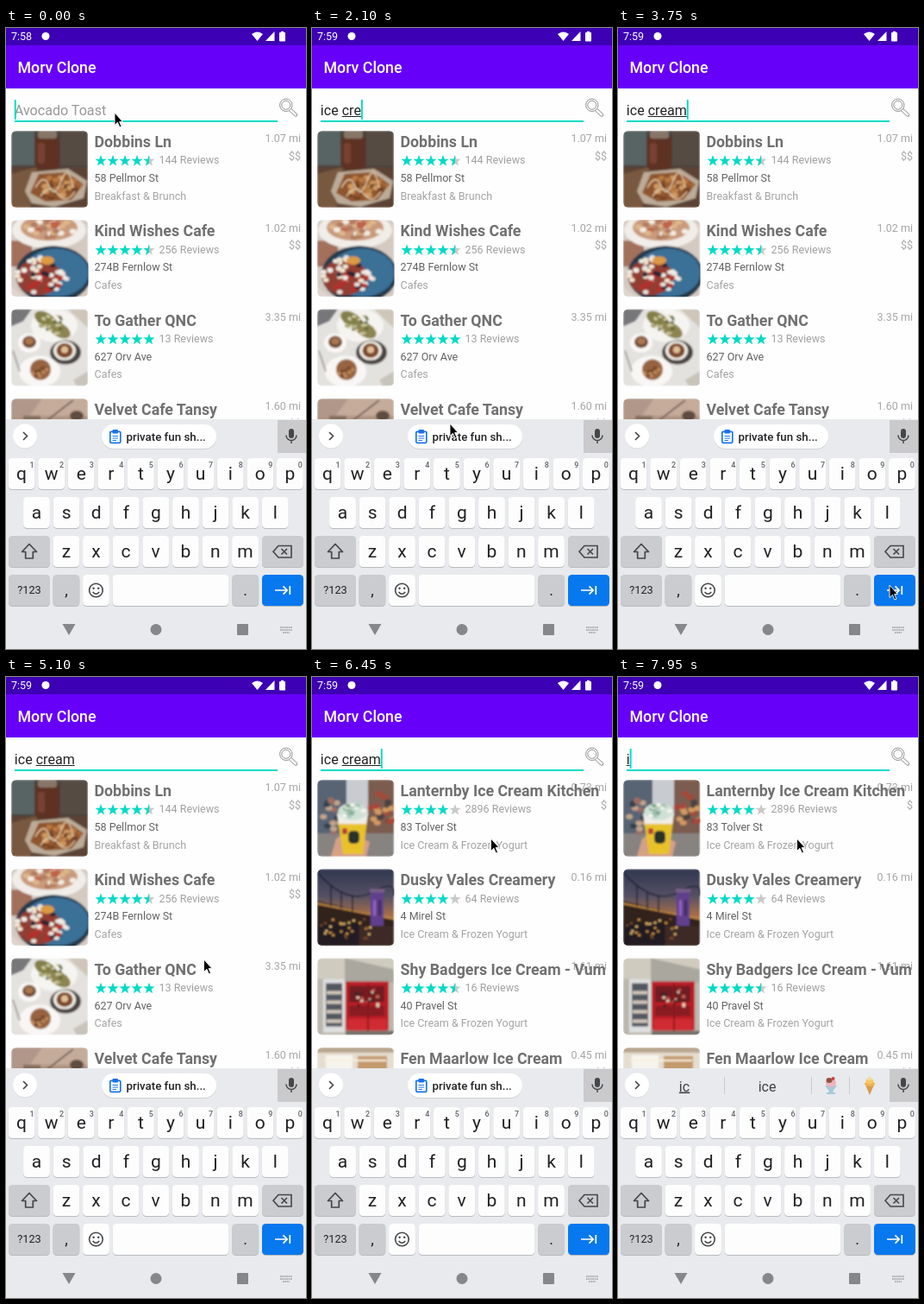
These frames come from a looping animation (348x719 px, 8 s). An HTML page:

```html
<!DOCTYPE html>
<html lang="en">
<head>
<meta charset="utf-8">
<title>Restaurant search</title>
<style>
html, body { margin: 0; width: 100%; height: 100%; overflow: hidden; background: #fff; }
svg { display: block; width: 348px; height: 719px; font-family: Roboto, sans-serif; }
text { white-space: pre; }
</style>
</head>
<body>
<svg id="stage" viewBox="0 0 348 719" xmlns="http://www.w3.org/2000/svg"></svg>
<script>
const LOOP = 8000, TEAL = '#03dac5', PITCH = 103.3;

const rect = (x, y, w, h, fill, r = 0, extra = '') =>
  `<rect x="${x}" y="${y}" width="${w}" height="${h}" rx="${r}" fill="${fill}" ${extra}/>`;
const oval = (x, y, rx, ry, fill, extra = '') =>
  `<ellipse cx="${x}" cy="${y}" rx="${rx}" ry="${ry}" fill="${fill}" ${extra}/>`;
const path = (d, fill, extra = '') => `<path d="${d}" fill="${fill}" ${extra}/>`;
const line = (d, stroke, width = 1, extra = '') =>
  `<path d="${d}" fill="none" stroke="${stroke}" stroke-width="${width}" ${extra}/>`;
const text = (x, y, size, fill, s, extra = '') =>
  `<text x="${x}" y="${y}" font-size="${size}" fill="${fill}" ${extra}>${s}</text>`;
const MID = 'text-anchor="middle"', END = 'text-anchor="end"', MEDIUM = 'font-weight="500"';

// Seeded scatter of small blobs inside an ellipse
function scatter(n, seed, cx, cy, rx, ry, size, colors) {
  let s = seed, out = '';
  const rnd = () => (s = (s * 16807) % 2147483647) / 2147483647;
  for (let i = 0; i < n; i++) {
    const a = rnd() * 6.283, d = Math.sqrt(rnd());
    out += oval(cx + rx * d * Math.cos(a), cy + ry * d * Math.sin(a), size, size * .75, colors[i % colors.length]);
  }
  return out;
}

const photos = {
  toast: () => rect(0, 0, 89, 89, '#47423d') + rect(0, 0, 27, 40, '#596463') + rect(57, 0, 32, 40, '#564b42') +
    rect(0, 42, 89, 47, '#5b4335') + path('M0 50L30 42 22 89H0Z', '#79593f') +
    rect(28, 5, 28, 40, '#5d3124', 5) + rect(31, 0, 22, 9, '#877568', 3) + rect(31, 14, 8, 24, '#774231', 3) +
    path('M16 70L24 48 66 44 88 58 84 78 50 88 24 84Z', '#bcab98') + path('M22 72L32 50 64 48 84 62 70 80 40 82Z', '#8e552d') +
    scatter(34, 19, 52, 65, 27, 13, 4, ['#b97a41', '#6f3e22', '#cf9a63', '#94592f']) +
    line('M28 66Q38 48 44 64T58 58 72 66M34 76Q44 60 54 73T74 70', '#e6cdaa', 1.4),
  bowls: () => rect(0, 0, 89, 89, '#d5cac2') + rect(0, 24, 24, 30, '#a3705c') + oval(44, 12, 43, 21, '#f1ede9') +
    oval(44, 9, 33, 15, '#c99a7c') + scatter(28, 31, 44, 9, 30, 12, 4, ['#f3ece2', '#c0644a', '#dcb68b', '#b27d61']) +
    oval(49, 63, 44, 33, '#283b4c') + oval(52, 61, 38, 28, '#3a6f97') + oval(32, 66, 26, 21, '#933d33') +
    scatter(56, 77, 36, 64, 29, 21, 3.3, ['#f2eee6', '#b82e2c', '#2c2430', '#f3e7d1', '#e8e4df']) +
    oval(42, 47, 8, 5, '#dd9a42') + path('M0 77L14 89H0Z', '#ddd6cf'),
  brunch: () => rect(0, 0, 89, 89, '#e4e2df') + path('M0 0H24L14 14 0 20Z', '#77777a') + path('M66 0H89V22Z', '#cfc6ba') +
    oval(50, 19, 27, 19, '#f6f4f1') +
    oval(40, 12, 14, 8, '#837f48', 'transform="rotate(30 40 12)"') + oval(56, 24, 14, 8, '#8d8551', 'transform="rotate(30 56 24)"') +
    scatter(24, 9, 49, 18, 17, 11, 2, ['#c7c49a', '#57602f', '#d8d2a8']) +
    oval(21, 39, 13, 11, '#faf8f6') + oval(21, 38, 8, 7, '#6f4931') + oval(21, 37, 5, 4, '#a97750') +
    oval(63, 50, 18, 14, '#4a4542') + oval(62, 48, 13, 11, '#f3efe9') + oval(62, 48, 9.5, 8.5, '#7d4a2a') + oval(62, 47, 4, 4, '#e0c09a') +
    oval(33, 72, 24, 18, '#f9f7f5') + oval(34, 70, 12, 12, '#98643f') + scatter(12, 27, 34, 70, 10, 10, 2.4, ['#c18b5c', '#714429']) +
    path('M72 82L89 72V89H76Z', '#c8c3bb') + line('M2 48L10 72', '#a5a29e', 2),
  cafe: () => rect(0, 0, 89, 89, '#c5ab9a') + path('M0 0H36L18 25H0Z', '#b0978a') + rect(0, 20, 89, 24, '#b19584') +
    line('M42 25L72 2', '#443731', 1.3) + oval(76, 20, 8, 6, '#5e4b41') + rect(14, 20, 20, 8, '#86705f'),
  cup: () => rect(0, 0, 89, 89, '#8b8a8a') + path('M0 0H36L32 66H0Z', '#596473') + path('M89 0H58L54 70H89Z', '#7b5b50') +
    rect(34, 0, 25, 40, '#c8ccd0') + rect(0, 62, 89, 27, '#868381') +
    scatter(18, 41, 15, 44, 14, 21, 4, ['#334050', '#9c6c62', '#c0a58c']) + scatter(20, 55, 75, 38, 13, 24, 4, ['#a84739', '#d19a64', '#4c4341']) +
    path('M16 89L22 68 35 61 61 72 57 89Z', '#d5a086') + path('M24 47H58L53 86H30Z', '#e9c229') +
    path('M23 39H59L57 51H25Z', '#f0eee8') + oval(41, 37, 17, 10, '#cfe1d5') + scatter(18, 14, 41, 36, 14, 8, 3, ['#f4f4ed', '#7fa68c', '#a6c5b5']) +
    rect(36, 59, 13, 15, '#2c302c', 5) + rect(29, 56, 6, 7, '#b7412e', 2),
  bridge: () => rect(0, 0, 89, 89, 'url(#dusk)') + path('M0 37L89 58V89H0Z', '#32231f') +
    line('M0 40L89 58', '#c28a43', 2) + line('M0 4Q35 43 64 27T89 31M16 18V43M28 26V46M41 31V49', '#171a2b', 1.3) +
    rect(62, 25, 15, 41, '#60418c') + rect(61, 23, 17, 4, '#796087') + rect(65, 36, 3, 18, '#9363c4') + rect(71, 36, 3, 18, '#40295f') +
    rect(0, 63, 48, 26, '#241f20') + rect(49, 66, 40, 23, '#3d2c26') + scatter(28, 93, 38, 69, 39, 13, 1.6, ['#e0a04c', '#80502f', '#efc578']),
  shop: () => rect(0, 0, 89, 89, '#bcb7ad') + path('M0 0H89V24H0Z', '#d0cbbf') + path('M32 0L89 13V28H32Z', '#a9a79e') +
    rect(7, 24, 25, 62, '#dedfdf') + rect(10, 29, 19, 50, '#535960') + line('M11 40H28M11 51H28M11 62H28M11 73H28', '#d3c7ba', 4) +
    rect(33, 27, 50, 56, '#bc1d25') + rect(37, 32, 41, 19, '#711b20') + rect(37, 55, 41, 12, '#891a21') + rect(35, 70, 46, 14, '#d02a31') +
    scatter(20, 23, 58, 48, 18, 13, 2, ['#e7d5c0', '#2e2425', '#c75a4d']) + rect(58, 29, 2, 55, '#8c151c') + rect(33, 84, 56, 5, '#76706b'),
  parlor: () => rect(0, 0, 89, 89, '#e5ddd0') + rect(0, 0, 89, 6, '#b9a68f') + rect(10, 9, 31, 17, '#f7f4ee') +
    rect(47, 10, 34, 18, '#c49a6d') + line('M8 15H80', '#f8efdc', 2)
};

function star(cx, cy, fill) {
  const pts = [...Array(10)].map((_, i) => {
    const a = i * Math.PI / 5, r = i % 2 ? 2.8 : 6.9;
    return `${(cx + r * Math.sin(a)).toFixed(2)},${(cy - r * Math.cos(a)).toFixed(2)}`;
  });
  const poly = (p, c) => `<polygon points="${p.join(' ')}" fill="${c}"/>`;
  return poly(pts, fill >= 1 ? TEAL : '#c9c9c9') +
    (fill === .5 ? poly([pts[0], ...pts.slice(5)], TEAL) : '');
}

function row(item, i) {
  const [photo, name, rating, reviews, address, kind, distance, price] = item;
  const stars = [0, 1, 2, 3, 4].map(k => star(110 + 14 * k, 35, Math.max(0, Math.min(1, rating - k)))).join('');
  return `<g transform="translate(0 ${119 + PITCH * i})">
    <g transform="translate(6 0)" clip-path="url(#photo)"><g filter="url(#soft)">${photos[photo]()}</g></g>
    ${text(342, 13.3, 12.5, '#a6a6a6', distance, END)}${text(342, 34, 12.5, '#a6a6a6', price, END)}
    ${text(102.5, 19, 17.8, '#707070', name, 'font-weight="700"')}${stars}
    ${text(177.5, 38.4, 12.5, '#a0a0a0', reviews + ' Reviews')}
    ${text(102.5, 59, 12.5, '#626262', address)}${text(102.5, 79.6, 12.5, '#a3a3a3', kind)}</g>`;
}

const brunchList = [
  ['toast', 'Dobbins Ln', 4.5, 144, '58 Pellmor St', 'Breakfast &amp; Brunch', '1.07 mi', '$$'],
  ['bowls', 'Kind Wishes Cafe', 4.5, 256, '274B Fernlow St', 'Cafes', '1.02 mi', '$$'],
  ['brunch', 'To Gather QNC', 5, 13, '627 Orv Ave', 'Cafes', '3.35 mi', ''],
  ['cafe', 'Velvet Cafe Tansy', 4.5, 80, '', 'Cafes', '1.60 mi', '$$']
];
const sweet = 'Ice Cream &amp; Frozen Yogurt';
const sweetList = [
  ['cup', 'Lanternby Ice Cream Kitchen', 4, 2896, '83 Tolver St', sweet, '0.73 mi', '$'],
  ['bridge', 'Dusky Vales Creamery', 4, 64, '4 Mirel St', sweet, '0.16 mi', ''],
  ['shop', 'Shy Badgers Ice Cream - Vumilo', 4.5, 16, '40 Pravel St', sweet, '1.61 mi', ''],
  ['parlor', 'Fen Maarlow Ice Cream', 4, 90, '', sweet, '0.45 mi', '$$']
];

function key(x, y, w, label = '', fill = '#fdfdfd', size = 21) {
  return rect(x, y + 1, w, 36, '#b9bbbf', 4.5) + rect(x, y, w, 36, fill, 4.5) +
    text(x + w / 2, y + 17.7 + size * .33, size, '#202124', label, MID);
}

function keyboard() {
  const step = 34.6, w = 30.8, gray = '#cacccf', ink = '#444649';
  const letters = (s, x, y) => [...s].map((c, i) => key(x + step * i, y, w, c)).join('');
  const digits = [...'1234567890'].map((d, i) => text(30 + step * i, 508.5, 9, '#5f6368', d, MID + ' ' + MEDIUM)).join('');
  return rect(0, 453, 348, 266, '#e8eaed') +
    letters('qwertyuiop', 2.6, 498) + digits + letters('asdfghjkl', 20.1, 543) + letters('zxcvbnm', 54.5, 588) +
    key(3, 588, 48, '', gray) + key(297, 588, 48, '', gray) +
    line('M27 597.5L18.5 606.5H22.7V614H31.3V606.5H35.5Z', ink, 1.7, 'stroke-linejoin="round"') +
    line('M316 599.5H331V613H316L310 606.2Z M319.5 603L326 609.5M326 603L319.5 609.5', ink, 1.6) +
    key(3, 633, 48, '?123', gray, 12.8) + key(54.5, 633, w, ',', gray, 18) + key(89.1, 633, w) +
    oval(104.4, 651, 7.8, 7.8, 'none', `stroke="${ink}" stroke-width="1.6"`) + oval(101.6, 648.8, 1.2, 1.2, ink) + oval(107.2, 648.8, 1.2, 1.2, ink) +
    line('M100.6 653Q104.4 657.5 108.2 653', ink, 1.5) +
    key(123.7, 633, 134.6) + key(262.3, 633, w, '.', gray, 18) + key(297, 633, 48, '', '#0878ee') +
    line('M312 651H326M321.5 646.3L326.2 651 321.5 655.7M329.3 646V656', '#fff', 1.7) +
    path('M65.5 690H80.5L73 703Z', '#85878a') + oval(174, 696.5, 6.5, 6.5, '#85878a') + rect(268, 690, 13, 13, '#85878a', 1) +
    line('M318 694H332M318 697H332M321 700H329', '#9b9da0', 1.6, 'stroke-dasharray="1.7 .7"') +
    rect(315, 454, 33, 38, '#cacacc') + rect(328, 464, 6, 11, ink, 3) + line('M325 471.5A6 6 0 0 0 337 471.5M331 477.5V481', ink, 1.5) +
    oval(22, 473.3, 14, 14, '#d0d2d5') + oval(22, 472.5, 14, 14, '#fff') + line('M20 468L24.5 472.5 20 477', ink, 1.6);
}

const clipboard = rect(111, 460, 133, 28, '#cfd1d4', 14) + rect(111, 459, 133, 28, '#fff', 14) +
  rect(120.8, 467.3, 12, 13, 'none', 1.2, 'stroke="#1a73e8" stroke-width="1.7"') + rect(123.5, 465, 6.5, 4.5, '#1a73e8', 1) +
  line('M123.5 472.5H130M123.5 475H130M123.5 477.5H128', '#1a73e8', 1.1) +
  text(139.5, 478, 13.3, '#202124', 'private fun sh...', MEDIUM);

const suggestions = text(77, 479.5, 16, '#3c4043', 'ic', MID + ' text-decoration="underline"') +
  text(173, 479.5, 16, '#3c4043', 'ice', MID) + line('M123.5 463V483M224.5 463V483M268.5 463V483', '#c8cacd') +
  path('M240 473H254L249.5 479V481H252V483H242V481H244.5V479Z', '#a8c9d8') + oval(247, 470, 6, 5, '#efb3bd') +
  oval(245, 467, 3.5, 3, '#8d5541') + oval(249.5, 465, 2, 2, '#d93a3e') +
  path('M287 472H297L292 484Z', '#d79a4d') + oval(292, 471, 6, 3, '#f0b34d') + oval(292, 468, 4.5, 3, '#f6c766') + path('M289 467L292 462 295 467Z', '#f9d98c');

const searchIcon = line('M329.5 94.5L336 100.5', '#929292', 4.4, 'stroke-linecap="round"') +
  line('M330 95L336 100.5', '#fefefe', 2.4, 'stroke-linecap="round"') +
  oval(324.8, 89.3, 7.2, 7.2, '#fefefe', 'stroke="#929292"') + oval(324.8, 89.3, 5, 5, '#fefefe', 'stroke="#929292"');

const stage = document.getElementById('stage');
stage.innerHTML = `<defs>
  <clipPath id="photo"><rect width="89.5" height="89" rx="6"/></clipPath>
  <clipPath id="list"><rect y="110" width="342" height="344"/></clipPath>
  <filter id="soft" x="0" y="0" width="1" height="1"><feGaussianBlur stdDeviation=".8"/></filter>
  <linearGradient id="dusk" x2="0" y2="1"><stop stop-color="#30374f"/><stop offset=".35" stop-color="#555064"/><stop offset=".6" stop-color="#a86e49"/></linearGradient>
</defs>
${rect(0, 0, 348, 719, '#fefefe')}${rect(0, 20, 348, 50, '#6700f8')}${rect(0, 0, 348, 20, '#3d00b5')}
${text(6, 14.3, 12.5, '#fff', '', 'id="clock"')}
${oval(46, 9.5, 4.5, 4.5, '#fff')}
${path('M285 7Q291.5 2 298 7L291.5 15Z', '#fff')}${path('M311.5 4V15H301Z', '#fff')}${rect(317, 5, 7, 10.5, '#fff', 1)}${rect(319, 3.8, 3, 2, '#fff')}
${text(13.5, 52, 17.8, '#fff', 'Morv Clone', MEDIUM)}
${text(9.8, 101.2, 16.1, '#989898', 'Avocado Toast', 'id="hint"')}
${text(9.8, 101.2, 16.1, '#222', '', 'id="query"')}${rect(10, 102, 0, 1, '#222', 0, 'id="underline"')}
${rect(10, 107, 305, 2, TEAL)}${rect(10, 83, 1.9, 23, TEAL, 0, 'id="caret"')}
${searchIcon}
<g clip-path="url(#list)"><g id="brunch">${brunchList.map(row).join('')}</g><g id="sweet">${sweetList.map(row).join('')}</g></g>
${keyboard()}<g id="clip">${clipboard}</g><g id="suggest">${suggestions}</g>
${path('M0 0V14.5L3.4 11.3 6 17 8 16 5.6 10.6H9.5Z', '#000', 'id="mouse" stroke="#fff" stroke-width=".9"')}`;

const el = id => document.getElementById(id);
const show = (id, on) => el(id).setAttribute('visibility', on ? 'visible' : 'hidden');

// Each track lists [start time, value]; a value holds until the next one
const typed = [[0, ''], [1200, 'i'], [1500, 'ic'], [1650, 'ice'], [1950, 'ice c'], [2100, 'ice cre'], [2250, 'ice cream'],
  [7200, 'ice crea'], [7500, 'ice cre'], [7650, 'ice c'], [7800, 'ice'], [7950, 'i']];
const caretFlips = [300, 750, 3000, 3600, 4050, 4500, 4950, 5550, 6000, 6450, 7050, 7200];
const mousePath = [[0, [126, 98]], [1500, [143, 280]], [1650, [160, 458]], [3000, [165, 162]], [3150, [190, 250]],
  [3300, [225, 370]], [3450, [265, 500]], [3600, [300, 610]], [3750, [315, 645]], [3900, [317.5, 652]],
  [4950, [280, 510]], [5100, [229.5, 327]], [5250, [207.5, 187]]];
const at = (track, t) => track.filter(k => k[0] <= t).pop()[1];

function render(t) {
  const value = at(typed, t), query = el('query');
  el('clock').textContent = t < 1050 ? '7:58' : '7:59';
  query.textContent = value;
  show('hint', !value);

  const width = n => n ? query.getSubStringLength(0, n) : 0;
  const wordStart = value.lastIndexOf(' ') + 1;
  const marked = t >= 2250 && t < 2550 ? value.length - 1 : value.length;
  const from = width(wordStart);
  el('underline').setAttribute('x', 9.8 + from);
  el('underline').setAttribute('width', t < 1500 ? 0 : width(marked) - from);
  el('caret').setAttribute('x', 9.8 + width(value.length));
  show('caret', caretFlips.filter(f => f <= t).length % 2 === 0);

  show('brunch', t < 5250);
  show('sweet', t >= 5250);
  show('clip', t < 7950);
  show('suggest', t >= 7950);
  el('mouse').setAttribute('transform', `translate(${at(mousePath, t)})`);
}

const start = performance.now();
function tick() {
  render((performance.now() - start) % LOOP);
  requestAnimationFrame(tick);
}
tick();
</script>
</body>
</html>
```
